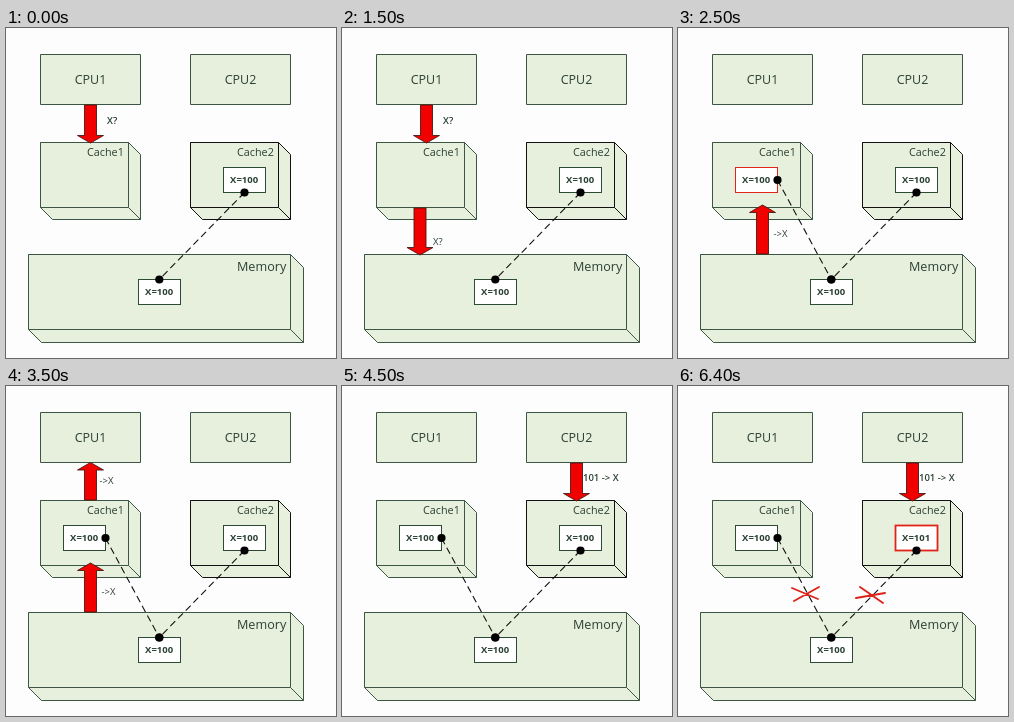
Write an HTML page that moves like this. It is 330 px wide and 330 px high and loops after 7 s.

```html
<!DOCTYPE html>
<html lang="en">
<head>
<meta charset="utf-8">
<title>Cache coherence</title>
<style>
  html, body { margin: 0; width: 100%; height: 100%; overflow: hidden; background: #fdfdfd; }
  svg { display: block; width: 100vw; height: 100vh; }
  text { font-family: "Open Sans", "Noto Sans", sans-serif; fill: #2b4034; }
  .block { fill: #e7efdd; stroke: #3d5544; stroke-linejoin: round; }
  .dark { stroke: #111; }
  .value { fill: #fff; stroke: #2c4a35; }
  .arrow { fill: #f20000; stroke: #4a1a16; stroke-width: .9; }
  .link { stroke: #111; stroke-width: 1.1; stroke-dasharray: 7 4; }
  .cross { fill: none; stroke: #dc2418; stroke-width: 1.9; stroke-linecap: round; }
</style>
</head>
<body>
<svg id="stage" viewBox="0 0 330 330"></svg>
<script>
const stage = document.getElementById("stage");
const starts = [0, 1500, 2500, 3500, 4500, 5500];
const duration = 7000;

const label = (x, y, size, text, extra = "") =>
  `<text x="${x}" y="${y}" font-size="${size}" ${extra}>${text}</text>`;

const rect = (x, y, w, h, cls, extra = "") =>
  `<rect x="${x}" y="${y}" width="${w}" height="${h}" class="${cls}" ${extra}/>`;

const cpu = (x, name) =>
  rect(x, 26.5, 100, 50, "block") + label(x + 50, 55.5, 12.5, name, 'text-anchor="middle"');

// Silhouette first, then the front face and the edge joining it to the back corner.
function box3d(x, y, w, h, depth, cls = "") {
  const d = depth;
  return `<path class="block ${cls}" d="M${x} ${y}h${w}l${d} ${d}v${h}h${-w}l${-d} ${-d}z"/>` +
    rect(x, y, w, h, `block ${cls}`) +
    `<path class="block ${cls}" d="M${x + w} ${y + h}l${d} ${d}"/>`;
}

function value(x, y, number, outline = "", width = 1) {
  const style = outline ? `style="stroke:${outline};stroke-width:${width}"` : "";
  return rect(x, y, 42, 25, "value", style) +
    label(x + 20.6, y + 15.4, 9.5, `X=${number}`, 'text-anchor="middle" font-weight="700"');
}

// The tail sits at y1 and the tip at y2, so the arrow can point either way.
function arrow(x, y1, y2) {
  const neck = y2 - Math.sign(y2 - y1) * 7.5;
  return `<path class="arrow" d="M${x - 6} ${y1}V${neck}H${x - 13}L${x} ${y2}L${x + 13} ${neck}H${x + 6}V${y1}z"/>`;
}

const dot = (x, y) => `<circle cx="${x}" cy="${y}" r="4.1"/>`;

const link = (x, y) =>
  `<line class="link" x1="${x}" y1="${y}" x2="153.3" y2="251.5"/>` + dot(x, y) + dot(153.3, 251.5);

function scene(step) {
  const cached = step >= 2;
  const written = step === 5;
  const parts = [
    cpu(34.5, "CPU1"), cpu(184.5, "CPU2"),
    box3d(34.5, 114.5, 88, 65, 12), label(81, 128, 10.8, "Cache1"),
    box3d(184.5, 114.5, 88, 65, 12, "dark"), label(231, 128, 10.8, "Cache2"),
    box3d(22.5, 226.5, 262, 75, 13), label(231, 243, 12.6, "Memory"),
    value(132.5, 251.5, 100),
    value(217.5, 139.5, written ? 101 : 100, written ? "#e02418" : "", 1.8)
  ];
  if (cached) parts.push(value(57.5, 139.5, 100, step === 2 ? "#e02418" : ""), link(99.5, 152));
  parts.push(link(238.5, 164.5));

  if (step < 2) parts.push(arrow(84.5, 77, 115), label(101, 96, 9.5, "X?", 'font-weight="600"'));
  if (step === 1) parts.push(arrow(78, 180, 227), label(91, 216.5, 9.5, "X?"));
  if (step === 2 || step === 3) parts.push(arrow(84.5, 226, 177), label(95.5, 209, 9.5, "-&gt;X"));
  if (step === 3) parts.push(arrow(84.5, 114, 76.5), label(93.5, 98, 9.5, "-&gt;X"));
  if (step >= 4) parts.push(arrow(234.5, 77, 115), label(241, 95, 9.5, "101 -&gt; X", 'font-weight="600"'));
  if (written) parts.push('<path class="cross" d="M114 202L140 213M116 215L141 201M178 212L207 207M182 201L205 217"/>');
  return parts.join("");
}

let shown = -1;
function draw() {
  const time = performance.now() % duration;
  const step = starts.findLastIndex(start => time >= start);
  if (step !== shown) stage.innerHTML = scene(shown = step);
  requestAnimationFrame(draw);
}
draw();
</script>
</body>
</html>
```
